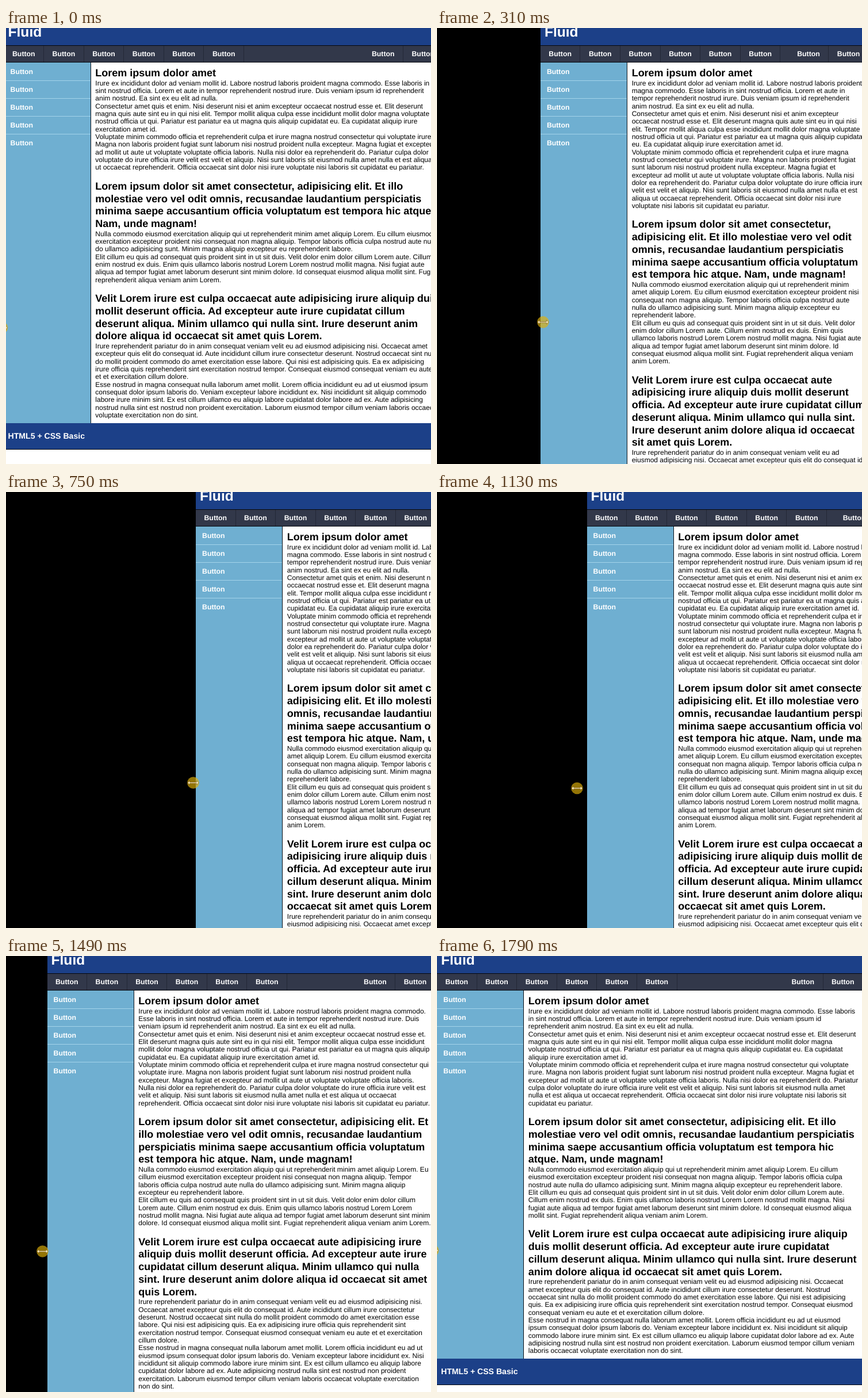
These frames come from a looping animation (739x758 px, 1.86 s). An HTML page:

```html
<!DOCTYPE html>
<html lang="en">
<head>
<meta charset="utf-8">
<title>Fluid layout</title>
<style>
* { box-sizing: border-box; margin: 0; padding: 0; }
html, body { width: 100%; height: 100%; overflow: hidden; background: #000; }
body {
  position: relative;
  font: 12px/13.33px "Liberation Sans", Arial, sans-serif;
  text-rendering: geometricPrecision;
  color: #000;
}
#page {
  position: absolute; top: 0;
  width: calc(var(--w) + 165.8px);
  min-height: 100%;
  background: #fff;
}
header { position: relative; height: 30px; background: #1c4088; overflow: hidden; }
h1 { position: absolute; left: 7px; top: -12px; font-size: 24.6px; line-height: 40px; color: #fff; }
nav {
  display: flex; height: 30px;
  background: #32384a;
  border: solid #05070c; border-width: 1px 0;
}
nav b, aside b { display: block; font-size: 12.3px; color: #fff; }
nav b {
  flex: none; width: 69.6px; line-height: 28px; text-align: center;
  border-right: 1px solid #232837;
}
nav .push { margin-left: auto; }
.body { display: flex; }
aside { flex: none; width: 151px; padding-top: .5px; background: #6fafd1; border-right: 1px solid #0a1018; }
aside b { height: 30.85px; line-height: 31px; padding-left: 11px; }
aside b + b { border-top: 1px solid #a3d3ea; line-height: 30px; }
main { flex: none; box-sizing: content-box; width: var(--w); padding: 8px 0 6.8px 7.8px; }
h2 { font-size: 18px; line-height: 21.7px; letter-spacing: -.02px; }
p + h2 { margin-top: 15.2px; }
footer { height: 46px; background: #1c4088; border-bottom: 1px solid #05070c; }
h3 { padding-left: 7px; font-size: 14.1px; line-height: 45px; color: #fff; }
#cursor { position: absolute; left: -11px; top: -11px; width: 22px; height: 22px; }
</style>
</head>
<body>
<div id="page">
  <header><h1>Fluid</h1></header>
  <nav>
    <b>Button</b><b>Button</b><b>Button</b><b>Button</b><b>Button</b><b>Button</b>
    <b class="push">Button</b><b>Button</b>
  </nav>
  <div class="body">
    <aside><b>Button</b><b>Button</b><b>Button</b><b>Button</b><b>Button</b></aside>
    <main>
      <h2>Lorem ipsum dolor amet</h2>
      <p>Irure ex incididunt dolor ad veniam mollit id. Labore nostrud laboris proident magna commodo. Esse laboris in sint nostrud officia. Lorem et aute in tempor reprehenderit nostrud irure. Duis veniam ipsum id reprehenderit anim nostrud. Ea sint ex eu elit ad nulla.</p>
      <p>Consectetur amet quis et enim. Nisi deserunt nisi et anim excepteur occaecat nostrud esse et. Elit deserunt magna quis aute sint eu in qui nisi elit. Tempor mollit aliqua culpa esse incididunt mollit dolor magna voluptate nostrud officia ut qui. Pariatur est pariatur ea ut magna quis aliquip cupidatat eu. Ea cupidatat aliquip irure exercitation amet id.</p>
      <p>Voluptate minim commodo officia et reprehenderit culpa et irure magna nostrud consectetur qui voluptate irure. Magna non laboris proident fugiat sunt laborum nisi nostrud proident nulla excepteur. Magna fugiat et excepteur ad mollit ut aute ut voluptate voluptate officia laboris. Nulla nisi dolor ea reprehenderit do. Pariatur culpa dolor voluptate do irure officia irure velit est velit et aliquip. Nisi sunt laboris sit eiusmod nulla amet nulla et est aliqua ut occaecat reprehenderit. Officia occaecat sint dolor nisi irure voluptate nisi laboris sit cupidatat eu pariatur.</p>
      <h2>Lorem ipsum dolor sit amet consectetur, adipisicing elit. Et illo molestiae vero vel odit omnis, recusandae laudantium perspiciatis minima saepe accusantium officia voluptatum est tempora hic atque. Nam, unde magnam!</h2>
      <p>Nulla commodo eiusmod exercitation aliquip qui ut reprehenderit minim amet aliquip Lorem. Eu cillum eiusmod exercitation excepteur proident nisi consequat non magna aliquip. Tempor laboris officia culpa nostrud aute nulla do ullamco adipisicing sunt. Minim magna aliquip excepteur eu reprehenderit labore.</p>
      <p>Elit cillum eu quis ad consequat quis proident sint in ut sit duis. Velit dolor enim dolor cillum Lorem aute. Cillum enim nostrud ex duis. Enim quis ullamco laboris nostrud Lorem Lorem nostrud mollit magna. Nisi fugiat aute aliqua ad tempor fugiat amet laborum deserunt sint minim dolore. Id consequat eiusmod aliqua mollit sint. Fugiat reprehenderit aliqua veniam anim Lorem.</p>
      <h2>Velit Lorem irure est culpa occaecat aute adipisicing irure aliquip duis mollit deserunt officia. Ad excepteur aute irure cupidatat cillum deserunt aliqua. Minim ullamco qui nulla sint. Irure deserunt anim dolore aliqua id occaecat sit amet quis Lorem.</h2>
      <p>Irure reprehenderit pariatur do in anim consequat veniam velit eu ad eiusmod adipisicing nisi. Occaecat amet excepteur quis elit do consequat id. Aute incididunt cillum irure consectetur deserunt. Nostrud occaecat sint nulla do mollit proident commodo do amet exercitation esse labore. Qui nisi est adipisicing quis. Ea ex adipisicing irure officia quis reprehenderit sint exercitation nostrud tempor. Consequat eiusmod consequat veniam eu aute et et exercitation cillum dolore.</p>
      <p>Esse nostrud in magna consequat nulla laborum amet mollit. Lorem officia incididunt eu ad ut eiusmod ipsum consequat dolor ipsum laboris do. Veniam excepteur labore incididunt ex. Nisi incididunt sit aliquip commodo labore irure minim sint. Ex est cillum ullamco eu aliquip labore cupidatat dolor labore ad ex. Aute adipisicing nostrud nulla sint est nostrud non proident exercitation. Laborum eiusmod tempor cillum veniam laboris occaecat voluptate exercitation non do sint.</p>
    </main>
  </div>
  <footer><h3>HTML5 + CSS Basic</h3></footer>
</div>
<svg id="cursor" viewBox="-11 -11 22 22">
  <circle r="10.3" fill="#e1b20a" fill-opacity=".66"/>
  <path d="M-9.5 0l3.6-3.6v2.7h11.8v-2.7L9.5 0 5.9 3.6v-2.7h-11.8v2.7z" fill="#fff0c4" stroke="#6b4a08" stroke-width=".6"/>
</svg>
<script>
const LOOP = 1860, TICKS = 25, MIN_TEXT = 404.1, CHROME = 165.8;

// The drag in a few points: tick, page left, page right, pointer x, pointer y
const peak = [330, 750, 325.5, 505.5];
const drag = [
  [0, -3.5, 760.6, -7, 521],
  [2, 38, 753.05, 42, 516],
  [6, 302.6, 750, 302, 508],
  [10, ...peak],
  [12, ...peak],
  [15, 260.5, 750, 243.5, 515],
  [20, 71.5, 746.8, 63.5, 513.5],
  [24, 0, 741.1, -7, 512]
];

// Cyclic access, with ticks running on past either end
function point(i) {
  const n = drag.length, turn = Math.floor(i / n);
  const [tick, ...values] = drag[i - turn * n];
  return [tick + turn * TICKS, ...values];
}

const rate = (a, b, c) => (b[c] - a[c]) / (b[0] - a[0]);

// Harmonic mean of both sides, flat at a turning point
function slope(i, c) {
  const p = point(i);
  const before = rate(point(i - 1), p, c), after = rate(p, point(i + 1), c);
  return before * after > 0 ? 2 * before * after / (before + after) : 0;
}

// Monotone cubic curve through the points of one column
function curve(tick, c) {
  const i = drag.filter(p => p[0] <= tick).length - 1;
  const a = point(i), b = point(i + 1), span = b[0] - a[0];
  const s = (tick - a[0]) / span, ease = s * s * (3 - 2 * s);
  return a[c] + (b[c] - a[c]) * ease
    + span * s * (1 - s) * ((1 - s) * slope(i, c) - s * slope(i + 1, c));
}

const page = document.getElementById("page");
const cursor = document.getElementById("cursor");
let shown = -1;

function show(tick) {
  const [left, right, x, y] = [1, 2, 3, 4].map(c => curve(tick, c));
  const text = Math.max(MIN_TEXT, right - left - CHROME);
  page.style.left = left + "px";
  page.style.setProperty("--w", text.toFixed(2) + "px");
  cursor.style.transform = `translate(${x}px, ${y}px)`;
  shown = tick;
}

const start = performance.now();
function run(now) {
  const t = Math.max(0, now - start) % LOOP;
  const tick = Math.floor(t / LOOP * TICKS);
  if (tick !== shown) show(tick);
  requestAnimationFrame(run);
}
show(0);
requestAnimationFrame(run);
</script>
</body>
</html>
```
